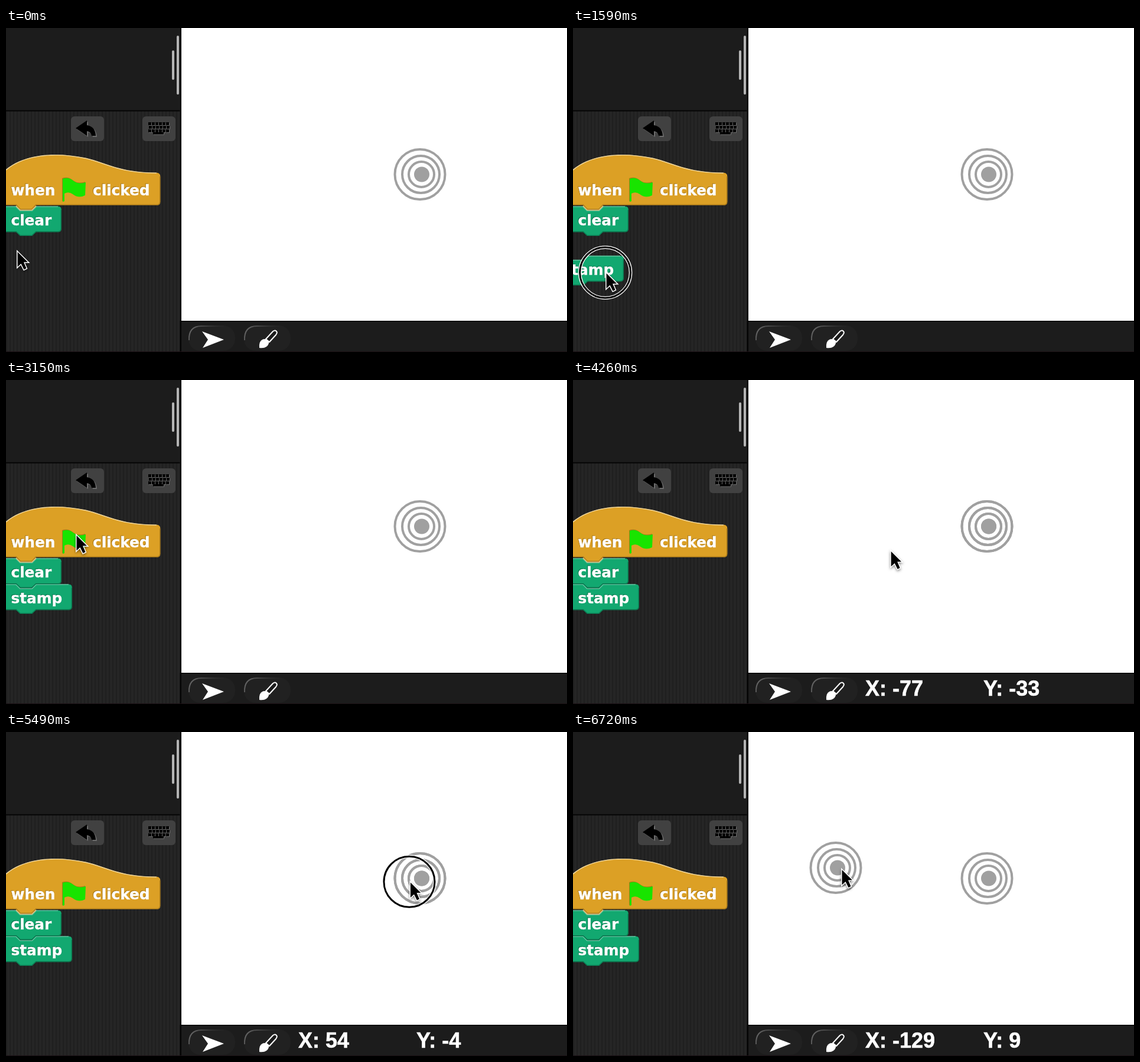
An HTML page with a canvas for the animation above (7380 ms loop, 950x550 px).

```html
<!DOCTYPE html>
<html lang="en">
<head>
<meta charset="utf-8">
<title>Stamping a sprite</title>
<style>
  html, body { margin: 0; width: 100%; height: 100%; overflow: hidden; background: #1c1c1c; }
  canvas { display: block; }
</style>
</head>
<body>
<canvas id="stage" width="950" height="550"></canvas>
<script>
const ctx = document.getElementById('stage').getContext('2d');
const LOOP = 7380, LAG = 60;

// Pointer path: time, x, y
const path = [
  [0, 18, 377], [240, -40, 384], [1170, -60, 426], [1590, 55, 413.5], [1950, 71, 399],
  [2160, 76, 382], [2340, 76, 382], [2700, 100, 312], [3080, 118, 261], [3840, 118, 261],
  [4200, 527, 290], [4260, 537, 288], [4600, 585, 284], [5330, 710, 249], [5430, 710, 249],
  [5490, 684, 252.5], [5600, 608, 262], [5800, 500, 254], [5910, 465, 242], [5970, 459, 238],
  [6210, 454, 231], [LOOP, 454, 231]
];
// Mouse button: down, up
const presses = [[1000, 2220], [3270, 3480], [5210, 6240]];
const DROP = 2220, STAMP = 3510, DRAG = 5430, GRAB = [710, 249], HOME = [701, 248.5];

const clamp = v => Math.max(0, Math.min(1, v));

// Monotone cubic interpolation of one coordinate
function slope(i, k) {
  const a = path[i - 1], b = path[i], c = path[i + 1];
  if (!a || !c) return 0;
  const p = (b[k] - a[k]) / (b[0] - a[0]), q = (c[k] - b[k]) / (c[0] - b[0]);
  return p * q > 0 ? 2 * p * q / (p + q) : 0;
}
function pointer(t) {
  const i = Math.max(0, path.findIndex(p => p[0] > t) - 1);
  const a = path[i], b = path[i + 1], d = b[0] - a[0], u = clamp((t - a[0]) / d), v = 1 - u;
  return [1, 2].map(k =>
    a[k] * v * v * (1 + 2 * u) + b[k] * u * u * (3 - 2 * u) +
    d * u * v * (v * slope(i, k) - u * slope(i + 1, k)));
}

function rect(x, y, w, h, fill, r = 0) {
  ctx.beginPath();
  ctx.roundRect(x, y, w, h, r);
  ctx.fillStyle = fill;
  ctx.fill();
}
function circle(x, y, r, width, color) {
  ctx.beginPath();
  ctx.arc(x, y, r, 0, 7);
  ctx.lineWidth = width;
  ctx.strokeStyle = color;
  ctx.stroke();
}
function shape(d, fill, stroke, width = 1) {
  const p = new Path2D(d);
  if (fill) { ctx.fillStyle = fill; ctx.fill(p); }
  if (stroke) { ctx.strokeStyle = stroke; ctx.lineWidth = width; ctx.stroke(p); }
}
function at(x, y, draw) {
  ctx.save();
  ctx.translate(x, y);
  draw();
  ctx.restore();
}
function boldText(text, x, y, color, weight) {
  ctx.fillStyle = ctx.strokeStyle = color;
  ctx.lineWidth = weight;
  ctx.fillText(text, x, y);
  ctx.strokeText(text, x, y);
}
function label(text, x, y, shadow) {
  ctx.font = 'bold 24.7px "DejaVu Sans", sans-serif';
  boldText(text, x - 1, y - 1, shadow, .4);
  boldText(text, x, y, '#fff', .4);
}

function background() {
  rect(0, 0, 950, 550, '#1c1c1c');
  rect(0, 141, 295, 409, '#252525');
  for (let x = 0; x < 295; x += 6) rect(x, 141, 2, 409, '#1f1f1f');
  rect(0, 139.5, 295, 2, '#050505');
  rect(294.5, 0, 2.5, 550, '#050505');
  rect(297, 0, 653, 497, '#fff');
  rect(297, 497, 653, 1.5, '#000');
  rect(0, 549, 950, 1, '#1a0f14');
  rect(289, 13, 4, 100, '#b5b5b5', 2);
  rect(281, 38, 4, 50, '#b5b5b5', 2);

  rect(110, 150, 56, 42, '#414141', 6);
  rect(231, 150, 56, 42, '#414141', 6);
  const undo = 'M118 170L137 157V165Q151 167 152 183H145Q144 176 137 175V183Z';
  at(2, 2, () => shape(undo, '#6c6c6c'));
  shape(undo, '#000');
  for (const [off, color] of [[1, '#6c6c6c'], [0, '#000']]) {
    for (let row = 0; row < 3; row++)
      for (let col = 0; col < 6; col++)
        rect(241 + col * 6 + (row === 1 ? 1 : 0) + off, 160 + row * 6 + off, 5, 5, color);
    rect(249 + off, 177 + off, 18, 3.5, color);
  }
}

function toolbar() {
  for (const x of [309, 403]) {
    rect(x, 505, 79, 43, '#212121', 20);
    const shine = ctx.createLinearGradient(x, 505, x + 55, 535);
    shine.addColorStop(0, '#777');
    shine.addColorStop(1, '#2220');
    shape(`M${x + 1} 530Q${x} 506 ${x + 22} 506H${x + 60}`, null, shine, 2);
  }
  shape('M332 515L369 529L333 543L342 529Z', '#fff');
  shape('M440 528L452 515Q456 512 458 515Q460 517 457 521L446 533Z', '#1c1c1c', '#fff', 2);
  shape('M429 543Q428 532 434 529Q439 526 444 531Q447 536 441 541Q437 544 429 543Z', '#fff');
}

// Fills a block and keeps its light and dark edges inside the outline
function bevel(upper, lower, corner, [fill, light, dark]) {
  ctx.save();
  const outline = new Path2D(upper + corner + lower + 'Z');
  ctx.clip(outline);
  ctx.fillStyle = fill;
  ctx.fill(outline);
  shape(corner.replace(/^Q\S+ \S+/, 'M') + lower, null, dark, 3);
  shape(upper, null, light, 3);
  ctx.restore();
}

const GREEN = ['#12a870', '#62c7a2', '#0b7a51'], ORANGE = ['#dca025', '#efd7a0', '#a8781a'];

function block(text, right, top) {
  const edge = right - 6, low = top + 44;
  bevel(`M-90 ${top}H17L24 ${top + 7}H44L51 ${top}H${edge}`,
    `V${low - 6}Q${right} ${low} ${edge} ${low}H51L44 ${low + 6.5}H24L17 ${low}H-90`,
    `Q${right} ${top} ${right} ${top + 6}`, GREEN);
  label(text, 8.5, top + 32.5, GREEN[2]);
}

function hat() {
  bevel('M-40 270Q-20 252 0 240C30 215 80 209 135 220.5C172 229 190 245 255 245.5',
    'V295Q261.5 301 255 301H51L44 308.5H24L17 301H-40', 'Q261.5 246 261.5 252', ORANGE);
  shape('M17 302L24 309H44L51 302', null, '#e8c47a', 1.5);
  label('when', 8.5, 284, ORANGE[2]);
  label('clicked', 147, 284, ORANGE[2]);
  const flag = 'M96 256Q106 252 115 260Q123 266 135 262L134 284Q123 290 113 282Q106 277 99 281V294L96 295Z';
  at(-1, -1, () => shape(flag, ORANGE[2]));
  shape(flag, '#18e400');
}

function sprite(x, y) {
  const gray = '#a0a0a0';
  circle(x, y, 42.5, 4, gray);
  circle(x + 1.5, y, 31.5, 4, gray);
  circle(x + 2.5, y, 21.5, 4, gray);
  rect(x - 10, y - 13, 26, 26, gray, 13);
}

function dragShadow(x, y) {
  ctx.save();
  ctx.filter = 'blur(2px)';
  rect(x - 30, y - 30, 88, 88, 'rgba(0,0,0,.12)', 44);
  ctx.restore();
}

function readout(x, y) {
  ctx.font = 'bold 36px "Liberation Sans", Arial, sans-serif';
  boldText('X: ' + Math.round((x - 634.6) / 1.4), 495, 536, '#fff', .6);
  boldText('Y: ' + Math.round((243.6 - y) / 1.4), 695, 536, '#fff', .6);
}

function cursor(x, y, t) {
  for (const [down, up] of presses) {
    ctx.globalAlpha = Math.min(clamp((t - down) / 120), clamp(1 - (t - up) / 240));
    if (!ctx.globalAlpha) continue;
    circle(x - .5, y + 1.7, 43, 5.5, '#fff');
    circle(x - .5, y + 1.7, 43, 3, '#000');
  }
  ctx.globalAlpha = 1;
  at(x, y, () => {
    const arrow = 'M1.5 3V28.5L7.5 23L12.5 33L16.5 31L12 20.5H19Z';
    ctx.shadowColor = 'rgba(0,0,0,.35)';
    ctx.shadowBlur = 4;
    ctx.shadowOffsetY = 2;
    shape(arrow, '#fff', '#fff', 3);
    ctx.shadowColor = 'transparent';
    shape(arrow, '#000');
  });
}

function render(t) {
  const [x, y] = pointer(t), [lx, ly] = pointer(t - LAG);
  background();
  toolbar();
  if (t >= STAMP) sprite(...HOME);
  const dragged = t > DRAG;
  const sx = HOME[0] + (dragged ? lx - GRAB[0] : 0);
  const sy = HOME[1] + (dragged ? ly - GRAB[1] : 0);
  const held = t > 5510 && t < 6270;
  if (held) dragShadow(sx, sy);
  ctx.globalAlpha = held ? .85 : 1;
  sprite(sx, sy);
  ctx.globalAlpha = 1;

  ctx.save();
  ctx.beginPath();
  ctx.rect(0, 141, 295, 409);
  ctx.clip();
  if (t >= DROP) block('stamp', 112, 346.5);
  else if (t > 1000) at(x - 81, y - 373.5, () => block('stamp', 112, 346.5));
  block('clear', 94, 302.5);
  hat();
  ctx.restore();

  if (lx > 297) readout(lx, ly);
  cursor(x, y, t);
}

const start = performance.now();
function tick() {
  render((performance.now() - start) % LOOP);
  requestAnimationFrame(tick);
}
tick();
</script>
</body>
</html>
```
